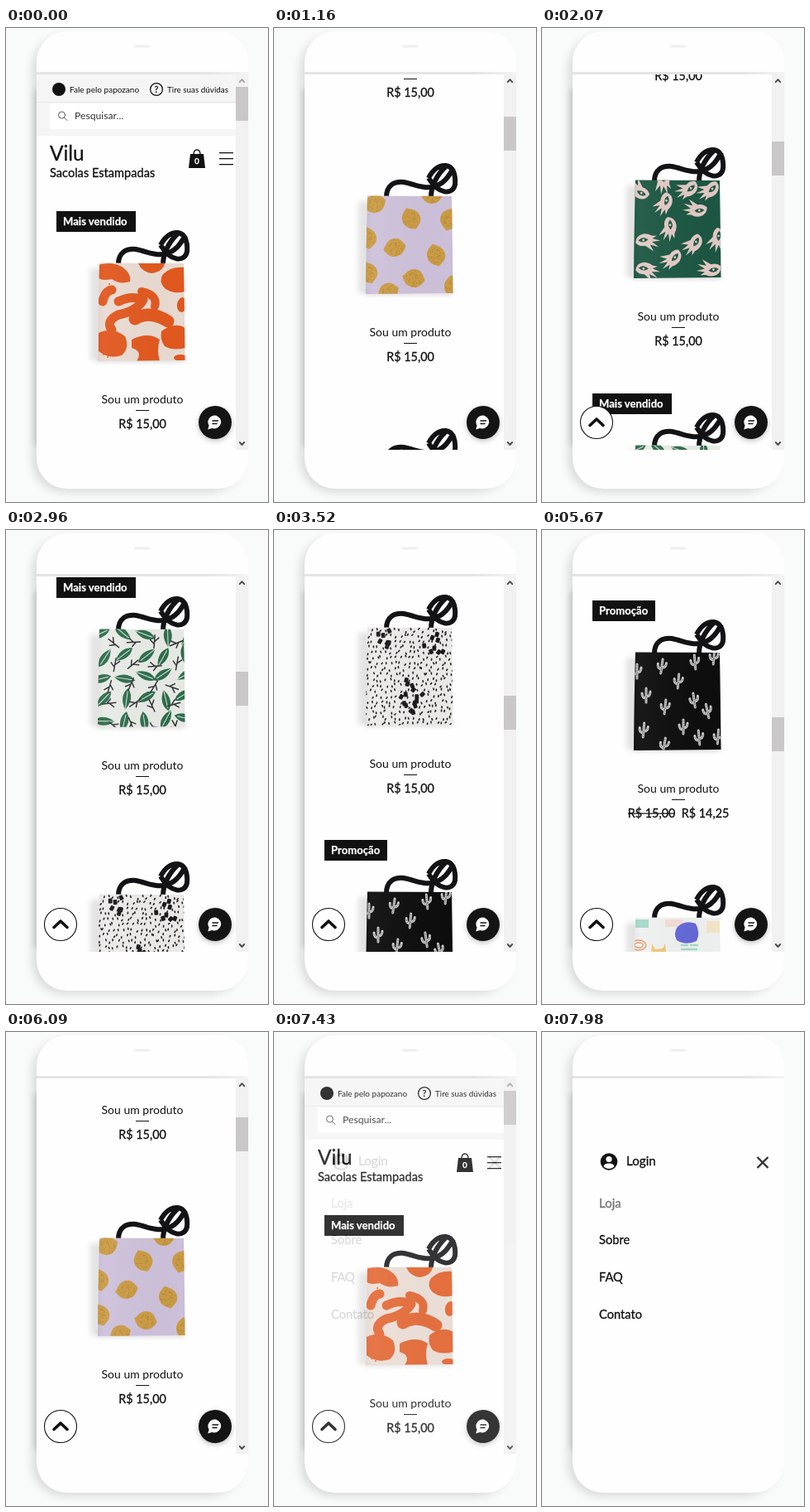
Animation of 317 by 572 pixels, one loop 8 s. Source, as an HTML page:

```html
<!DOCTYPE html>
<html lang="pt-BR">
<head>
<meta charset="utf-8">
<title>Loja de sacolas</title>
<style>
html, body { margin: 0; width: 100%; height: 100%; overflow: hidden; background: #f9fbfa; }
svg { display: block; position: absolute; left: 0; top: 0; }
text { font-family: Lato, "Open Sans", sans-serif; fill: #111; }
.medium { stroke: #111; stroke-width: .3px; }
.bold { font-weight: 700; fill: #fff; stroke: #fff; stroke-width: .25px; }
.line { fill: none; stroke-linecap: round; stroke-linejoin: round; }
</style>
</head>
<body>
<svg id="stage" width="317" height="572" viewBox="0 0 317 572"></svg>
<script>
const LOOP = 8000, STEP = 70, PITCH = 319.75;

// Scroll moves: start time, steps, from, to, sharpness of the ease
const moves = [
  [330, 7, 0, 300, 1.3],
  [1020, 9, 300, 600, 1],
  [1790, 12, 600, 1100, 2.84],
  [2960, 11, 1100, 1500, 1.22],
  [4190, 7, 1500, 1800, 1.3],
  [5600, 12, 1800, 0, 2.03]
];
const TOP_BUTTON_AT = 1300, MENU_AT = 7430, MENU_STEPS = 7;

const rect = (x, y, w, h, fill, more = '') =>
  `<rect x="${x}" y="${y}" width="${w}" height="${h}" fill="${fill}" ${more}/>`;
const circle = (x, y, r, fill, more = '') =>
  `<circle cx="${x}" cy="${y}" r="${r}" fill="${fill}" ${more}/>`;
const oval = (x, y, rx, ry, fill, turn = 0) =>
  `<ellipse rx="${rx}" ry="${ry}" fill="${fill}" transform="translate(${x} ${y}) rotate(${turn})"/>`;
const shape = (d, fill) => `<path d="${d}" fill="${fill}"/>`;
const line = (d, color, width, more = '') =>
  `<path class="line" d="${d}" stroke="${color}" stroke-width="${width}" ${more}/>`;
const text = (x, y, size, str, more = '') =>
  `<text x="${x}" y="${y}" font-size="${size}" ${more}>${str}</text>`;
const stamp = (art, spots) => spots.map(([x, y, turn = 0]) =>
  `<g transform="translate(${x} ${y}) rotate(${turn})">${art}</g>`).join('');

function randomFrom(seed) {
  return () => (seed = (seed * 16807) % 2147483647) / 2147483647;
}

function brushPrint() {
  const c = '#e2581f';
  return shape('M111 286Q128 281 140 288Q152 296 150 306Q138 310 128 303Q114 306 111 300Z', c) +
    shape('M160 284H192Q190 294 176 296Q164 294 160 284Z', c) +
    shape('M190 297Q200 287 217 289V318Q202 322 192 314Q184 306 190 297Z', c) +
    line('M117 330Q120 317 128 316', c, 11) +
    line('M128 364Q120 354 136 346Q158 342 166 328Q152 322 136 330', c, 11) +
    line('M164 318Q184 322 180 336', c, 10) +
    line('M156 351Q174 340 196 354', c, 15) +
    shape('M188 366Q204 354 217 362V386Q202 390 192 384Q186 376 188 366Z', c) +
    shape('M112 368Q128 360 144 372Q150 386 140 395Q124 400 112 390Z', c) +
    shape('M152 376Q172 366 186 376Q182 388 186 402H158Q166 390 152 386Z', c) +
    oval(211, 398, 8, 4, c) + oval(213, 334, 6, 9, c, 10) +
    line('M125 309h.1M130 312h.1M126 315h.1M118 394h.1M123 397h.1', c, 1.8);
}

function lemonPrint() {
  const rnd = randomFrom(31);
  let grain = '';
  for (let i = 0; i < 34; i++) {
    const a = rnd() * 6.28, r = 10 * Math.sqrt(rnd());
    grain += `M${(r * Math.cos(a)).toFixed(1)} ${(r * Math.sin(a)).toFixed(1)}h.1`;
  }
  const lemon = shape('M-14 0C-10-4-8-11 1-11C9-11 11-4 14 0C11 5 8 11 0 11C-8 11-11 5-14 0Z', '#cb9c45') +
    line(grain, '#a9792b', .9);
  return stamp(lemon, [[122, 293, -20], [166, 311, 65], [212, 312, -75], [146, 346, -10],
    [196, 355, 75], [113, 334, 80], [114, 376, 70], [169, 383, 10], [138, 400, -25],
    [191, 282, 0], [217, 393, 80]]);
}

function handPrint() {
  const skin = '#e2c9c5', green = '#1c5743';
  const hand = shape('M12-7Q15 1 8 6Q3 9-3 8L-9 10L-5 5L-15 6L-6 1L-16-2L-5-3L-12-9L0-6Q6-10 12-7Z', skin) +
    shape('M-1 2Q3-5 10-3Q7 5-1 2Z', green) + circle(4.5, -.5, 1.4, skin);
  return stamp(hand, [[148, 312, -50], [176, 295, -15], [202, 296, -20], [186, 319, 20],
    [154, 342, -70], [183, 361, -35], [212, 355, -60], [127, 357, -160], [157, 379, -25],
    [127, 392, -150], [203, 391, 15], [117, 296, 50], [146, 285, -90]]);
}

function leafPrint() {
  const rnd = randomFrom(77);
  const leaf = shape('M0-13Q10-2 0 13Q-10-2 0-13Z', '#2f6d4e') + line('M0-9V12', '#dfe6df', 1);
  const twig = line('M0 8V-8M0 3L-5-2M0 0L5-5', '#333', 1.5);
  const spots = n => Array.from({ length: n }, (_, i) =>
    [114 + (i % 5) * 25 + rnd() * 7, 288 + Math.floor(i / 5) * 25 + rnd() * 8, rnd() * 360]);
  return stamp(leaf, spots(25)) + stamp(twig, spots(25).map(([x, y, a]) => [x + 11, y + 9, a]));
}

function spotPrint() {
  const rnd = randomFrom(12);
  const heavy = [[132, 298], [156, 357], [194, 305], [168, 372]];
  const fine = [], bold = [];
  for (let row = 0; row < 18; row++) {
    for (let col = 0; col < 20; col++) {
      const x = 111 + col * 5.6 + rnd() * 4.5;
      const y = 285 + row * 6.6 + rnd() * 4.5;
      const near = Math.min(...heavy.map(([a, b]) => Math.hypot(x - a, y - b)));
      (near < 14 && rnd() > .55 ? bold : fine).push([x.toFixed(1), y.toFixed(1), Math.round(rnd() * 70 - 25)]);
    }
  }
  return stamp(oval(0, 0, .9, 1.7, '#222'), fine) + stamp(rect(-2.4, -3, 4.8, 6, '#191919', 'rx="1"'), bold);
}

function cactusPrint() {
  const d = 'M0 9V-8M0 4Q-5 4-5-2M0 2Q5 2 5-4';
  const cactus = line(d, '#c9c9c9', 3) + line(d, '#555', .7, 'stroke-dasharray="1 2"');
  return stamp(cactus, [[145, 300, 8], [185, 295, -5], [115, 306, 0], [208, 289, 5],
    [165, 318, 5], [126, 335, 0], [149, 349, 6], [184, 341, -8], [200, 354, -12],
    [171, 373, 0], [123, 377, 5], [190, 386, -5], [148, 395, 10], [213, 385, 4]]);
}

function sketchPrint() {
  const teal = '#a6d8c9', orange = '#ea9a6c', yellow = '#efc578';
  return rect(113, 286, 16, 10, teal) + rect(149, 286, 22, 9, '#f3ddd6') +
    rect(199, 288, 16, 14, '#f3e6c8') + rect(167, 354, 34, 30, teal) +
    rect(204, 332, 11, 22, '#dcebe8') + rect(111, 388, 28, 12, teal) +
    shape('M163 296Q172 286 186 291Q192 302 187 312Q174 318 163 311Q159 304 163 296Z', '#6468d8') +
    line('M169 317h7M180 317h8M169 322h18M173 327h13', teal, 2.5) +
    `<g fill="none" stroke="${orange}" stroke-width="1.5">` +
    '<ellipse cx="117" cy="317" rx="9" ry="6"/><ellipse cx="117" cy="317" rx="5" ry="3"/></g>' +
    shape('M133 315L137 322L146 321L149 315L151 334Q148 342 145 356Q137 356 137 340Q131 330 133 315Z', yellow) +
    line('M200 346Q186 340 184 352Q185 364 199 360M190 351l8-2', orange, 4) +
    line('M117 342l8 14M120 341l8 15M124 343l7 15M118 348l10 11', '#5a7396', 1) +
    '<circle cx="159" cy="356" r="5" fill="none" stroke="#889" stroke-width="1"/>' +
    rect(150, 378, 26, 7, yellow) + line('M180 394q12-9 28 0', orange, 3);
}

const products = [
  { cloth: '#eadbd2', print: brushPrint, tag: 'Mais vendido' },
  { cloth: '#cec1db', print: lemonPrint },
  { cloth: '#1c5743', print: handPrint },
  { cloth: '#e8ebe5', print: leafPrint, tag: 'Mais vendido' },
  { cloth: '#ecebea', print: spotPrint },
  { cloth: '#0d0d0e', print: cactusPrint, tag: 'Promoção', sale: true },
  { cloth: '#eff1f0', print: sketchPrint }
];

function productView({ cloth, print, tag, sale }, i) {
  const price = 'class="medium" text-anchor="middle"';
  const straps = 'M136 285C136 271 145 266 157 267C169 269 179 275 191 273C206 270 212 259 217 250' +
    'M190 285C190 272 197 258 208 248' +
    'M187 262C192 252 200 246 208 247C217 248 220 259 219 270C216 283 199 282 187 262';
  return `<g transform="translate(0 ${Math.floor(i * PITCH)})">` +
    rect(102, 290, 16, 111, '#bbb', 'opacity=".4" filter="url(#soft)"') +
    rect(112, 397, 104, 5, '#999', 'opacity=".5" filter="url(#soft)"') +
    `<path class="line" d="${straps}" stroke="#131316" stroke-width="6" style="stroke-linecap:butt"/>` +
    `<g clip-path="url(#bag)">${rect(105, 280, 120, 126, cloth)}${print()}` +
    `${rect(105, 280, 120, 126, 'url(#fold)')}</g>` +
    (tag ? rect(61, 221, sale ? 76 : 96, 25, '#111') + text(69, 238, 13.1, tag, 'class="bold"') : '') +
    text(165, 453, 14, 'Sou um produto', 'text-anchor="middle"') +
    rect(157, 461, 16, 1, '#111') +
    (sale
      ? text(132.5, 483, 14.4, 'R$ 15,00', price) + rect(104, 477.5, 57, 1.2, '#111') +
        text(197.5, 483, 14.4, 'R$ 14,25', price)
      : text(165, 483, 14.4, 'R$ 15,00', price)) + '</g>';
}

const header = rect(37, 56, 241, 74, '#f5f5f5') + rect(37, 89, 241, 1, '#e9e9e9') +
  rect(53, 91, 225, 31, '#fff') +
  circle(64, 74, 8, '#111') + text(77, 77.5, 10, 'Fale pelo papozano') +
  circle(182, 74, 7.4, 'none', 'stroke="#111" stroke-width="1.3"') +
  text(182, 78, 11, '?', 'text-anchor="middle" class="medium"') +
  text(195, 77.5, 9.9, 'Tire suas dúvidas') +
  circle(67.5, 105, 4, 'none', 'stroke="#555"') + line('M70.5 108L74 111.5', '#555', 1) +
  text(83, 110, 12.2, 'Pesquisar...', 'style="fill:#333"') +
  text(53, 160, 24.4, 'Vilu', 'class="medium"') +
  text(53, 180, 14.6, 'Sacolas Estampadas', 'class="medium"') +
  shape('M223 152H239L241 169H221Z', '#111') +
  line('M227 153C227 145 235 145 235 153', '#111', 1.4) +
  text(231, 163.5, 10, '0', 'class="bold" text-anchor="middle"') +
  rect(258, 150, 17, 1.3, '#111') + rect(258, 157, 17, 1.3, '#111') + rect(258, 164, 17, 1.3, '#111');

const scrollbar = rect(278, 56, 15, 453, '#f1f1f1') +
  line('M282.8 65.2L285.5 62.2L288.2 65.2', '#505050', 2, 'id="arrow"') +
  line('M282.8 500L285.5 503L288.2 500', '#505050', 2) +
  rect(278, 71, 15, 41, '#c9c7c8', 'id="thumb"');

const topButton = '<g id="up" visibility="hidden">' +
  circle(66, 476, 19.5, '#fff', 'stroke="#111" stroke-width="1.1"') +
  line('M58 479.5L66 472L74 479.5', '#111', 3.6) + '</g>';

const chat = circle(253, 478, 20, '#000', 'opacity=".25" filter="url(#soft)"') +
  circle(253, 476, 20, '#141414') +
  shape('M253 467.5A8.5 8 0 1 1 249 483L244.3 484.5L245.6 479.5A8.5 8 0 0 1 253 467.5Z', '#fff') +
  line('M250 474H256.5M250 477.5H255', '#141414', 1.5);

const menuItem = (y, label) => text(69, y, 14.7, label, 'class="medium"');
const menu = '<g id="menu" opacity="0">' + rect(37, 56, 256, 453, '#fefefe') +
  circle(81, 156.5, 10.3, '#111') + circle(81, 153.5, 3.6, '#fff') +
  shape('M74.5 162.5Q75 158.5 81 158.5Q87 158.5 87.5 162.5Q84 165 81 165Q78 165 74.5 162.5Z', '#fff') +
  text(102, 161, 15.2, 'Login', 'class="medium"') +
  line('M260.5 151L273.5 164M273.5 151L260.5 164', '#333', 2.4, 'style="stroke-linecap:butt"') +
  text(69, 212, 15, 'Loja', 'style="fill:#777;stroke:#777;stroke-width:.35px"') +
  menuItem(256, 'Sobre') + menuItem(301, 'FAQ') + menuItem(346, 'Contato') + '</g>';

const defs = `<defs>
  <clipPath id="view"><rect x="37" y="56" width="256" height="453"/></clipPath>
  <clipPath id="bag"><path d="M113 283.5L215 284Q216 340 216.5 401L111 402Q111.5 340 113 283.5Z"/></clipPath>
  <filter id="soft" x="-1" y="-1" width="3" height="3"><feGaussianBlur stdDeviation="3"/></filter>
  <filter id="wide" x="-.3" y="-.3" width="1.6" height="1.6"><feGaussianBlur stdDeviation="6"/></filter>
  <linearGradient id="fold"><stop stop-color="#000" stop-opacity=".08"/>
    <stop offset=".12" stop-color="#fff" stop-opacity=".05"/>
    <stop offset=".9" stop-color="#000" stop-opacity=".01"/><stop offset="1" stop-color="#000" stop-opacity=".08"/></linearGradient>
  <linearGradient id="edge"><stop offset=".8" stop-color="#e4e4e4"/><stop offset="1" stop-color="#f4f4f4"/></linearGradient>
</defs>`;

const phone = rect(32, 10, 252, 550, '#000', 'rx="38" opacity=".13" filter="url(#wide)"') +
  rect(34, 74, 20, 430, '#000', 'opacity=".12" filter="url(#soft)"') +
  rect(37, 4, 256, 552, '#fefefe', 'rx="37"') +
  rect(155, 20.5, 19, 3, '#eee', 'rx="1"') + rect(37, 53, 256, 3, 'url(#edge)');

document.getElementById('stage').innerHTML = defs + phone +
  `<g clip-path="url(#view)"><g id="page">${header}${products.map(productView).join('')}</g>` +
  scrollbar + topButton + chat + menu + '</g>';

const [page, thumb, arrow, up, menuLayer] =
  ['page', 'thumb', 'arrow', 'up', 'menu'].map(id => document.getElementById(id));

function scrollAt(t) {
  let pos = 0;
  for (const [start, steps, from, to, sharp] of moves) {
    if (t < start) break;
    const u = Math.min(1, (Math.floor((t - start) / STEP) + 1) / steps);
    const a = u ** sharp, b = (1 - u) ** sharp;
    pos = Math.round(from + (to - from) * a / (a + b));
  }
  return pos;
}

function draw(t) {
  const pos = scrollAt(t);
  page.setAttribute('transform', `translate(0 ${-pos})`);
  thumb.setAttribute('y', Math.round(71 + pos * .0893));
  arrow.setAttribute('stroke', pos ? '#505050' : '#a8a8a8');
  up.setAttribute('visibility', t >= TOP_BUTTON_AT ? 'visible' : 'hidden');
  const step = t < MENU_AT ? 0 : Math.floor((t - MENU_AT) / STEP) + 1;
  menuLayer.setAttribute('opacity', Math.min(1, step / MENU_STEPS));
}

function tick() {
  draw(performance.now() % LOOP);
  requestAnimationFrame(tick);
}
tick();
</script>
</body>
</html>
```
